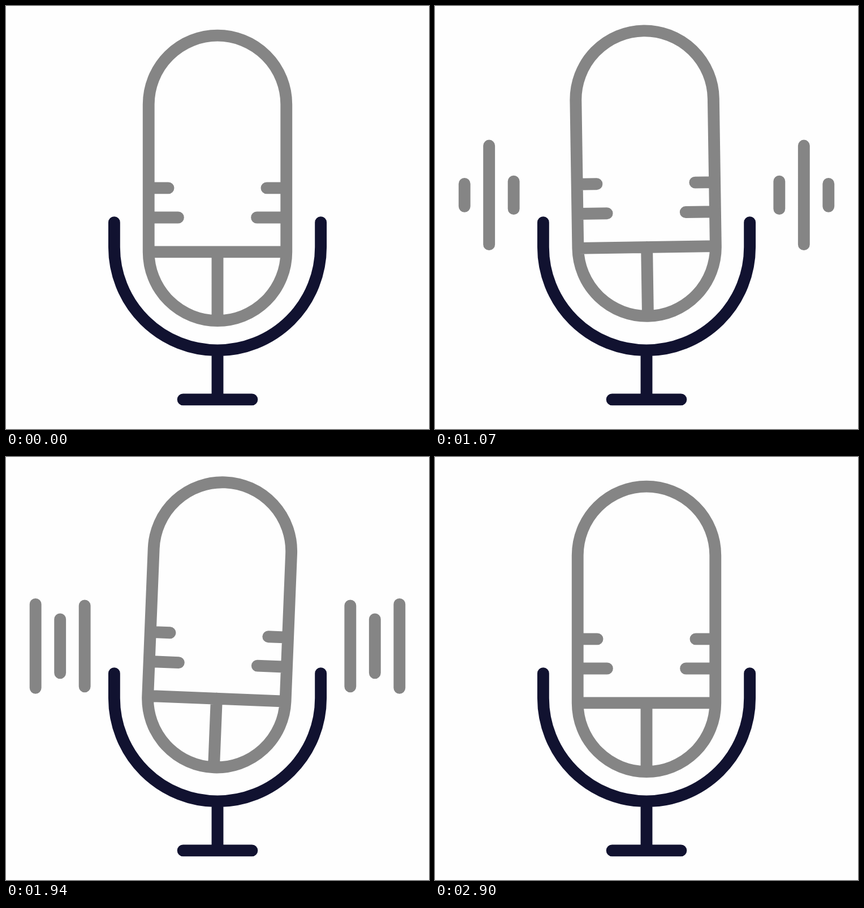
Animation, 748 px wide and 748 px high, one loop 2.93 s. Source, as an HTML page:

```html
<!DOCTYPE html>
<html lang="en">
<head>
<meta charset="utf-8">
<title>Microphone</title>
<style>
  html, body { margin: 0; width: 100%; height: 100%; overflow: hidden; background: #fefefe; }
  svg { display: block; width: 100%; height: 100%; }
  path { fill: none; stroke-width: 12; stroke-linecap: round; }
  .stand { stroke: #111230; }
  .grey { stroke: #858585; }
</style>
</head>
<body>
<svg viewBox="0 0 430 430">
  <path class="stand" d="M110 220v25a105 105 0 0 0 210 0v-25M215 350v50M180 400h70"/>
  <path id="bars" class="grey"/>
  <path id="capsule" class="grey" d="M145 100a70 70 0 0 1 140 0v150a70 70 0 0 1 -140 0z
    M145 250h140M215 250v70M145 185h20M145 215h30M285 185h-20M285 215h-30"/>
</svg>
<script>
const LOOP = 2930, STEP = 30;
const START = 500, END = 2890;
const WIDTH = 430, BAR_MIDDLE = 192.2;

// Every motion leaves zero at START and is back there by END.
const motion = (...keys) => [[START, 0], ...keys, [END, 0]];

const drop = motion([800, 30], [1120, -7], [1540, 30], [2055, -9], [2450, 10], [2800, 0]);
const tilt = motion([800, 2.4], [1310, -3.6], [1700, 8.6], [2180, -4], [2500, 0]);
const bars = [
  { x: 30, length: motion([800, 36], [1310, 12], [1700, 85], [2180, 85], [2450, 12]) },
  { x: 55, length: motion([800, 102], [1310, 99], [1700, 50], [2450, 70]) },
  { x: 80, length: motion([800, 29], [1310, 27], [2180, 94]) }
];

const ease = u => (1 - Math.cos(Math.PI * u)) / 2;

function valueAt(keys, t) {
  const next = keys.findIndex(([time]) => time > t);
  if (next < 1) return 0;
  const [t0, v0] = keys[next - 1], [t1, v1] = keys[next];
  return v0 + (v1 - v0) * ease((t - t0) / (t1 - t0));
}

function barPair({ x, length }, t) {
  const size = valueAt(length, t);
  if (size <= 0) return "";
  const line = px => `M${px} ${BAR_MIDDLE - size / 2}v${size}`;
  return line(x) + line(WIDTH - x);
}

const capsulePath = document.getElementById("capsule");
const barsPath = document.getElementById("bars");

function draw(time) {
  const loopTime = time % LOOP;
  const t = loopTime - (loopTime - START) % STEP;
  capsulePath.setAttribute("transform",
    `translate(0 ${valueAt(drop, t)}) rotate(${valueAt(tilt, t)} 215 227)`);
  barsPath.setAttribute("d", bars.map(bar => barPair(bar, t)).join(""));
}

const start = performance.now();
function tick() {
  draw(performance.now() - start);
  requestAnimationFrame(tick);
}
draw(0);
requestAnimationFrame(tick);
</script>
</body>
</html>
```
